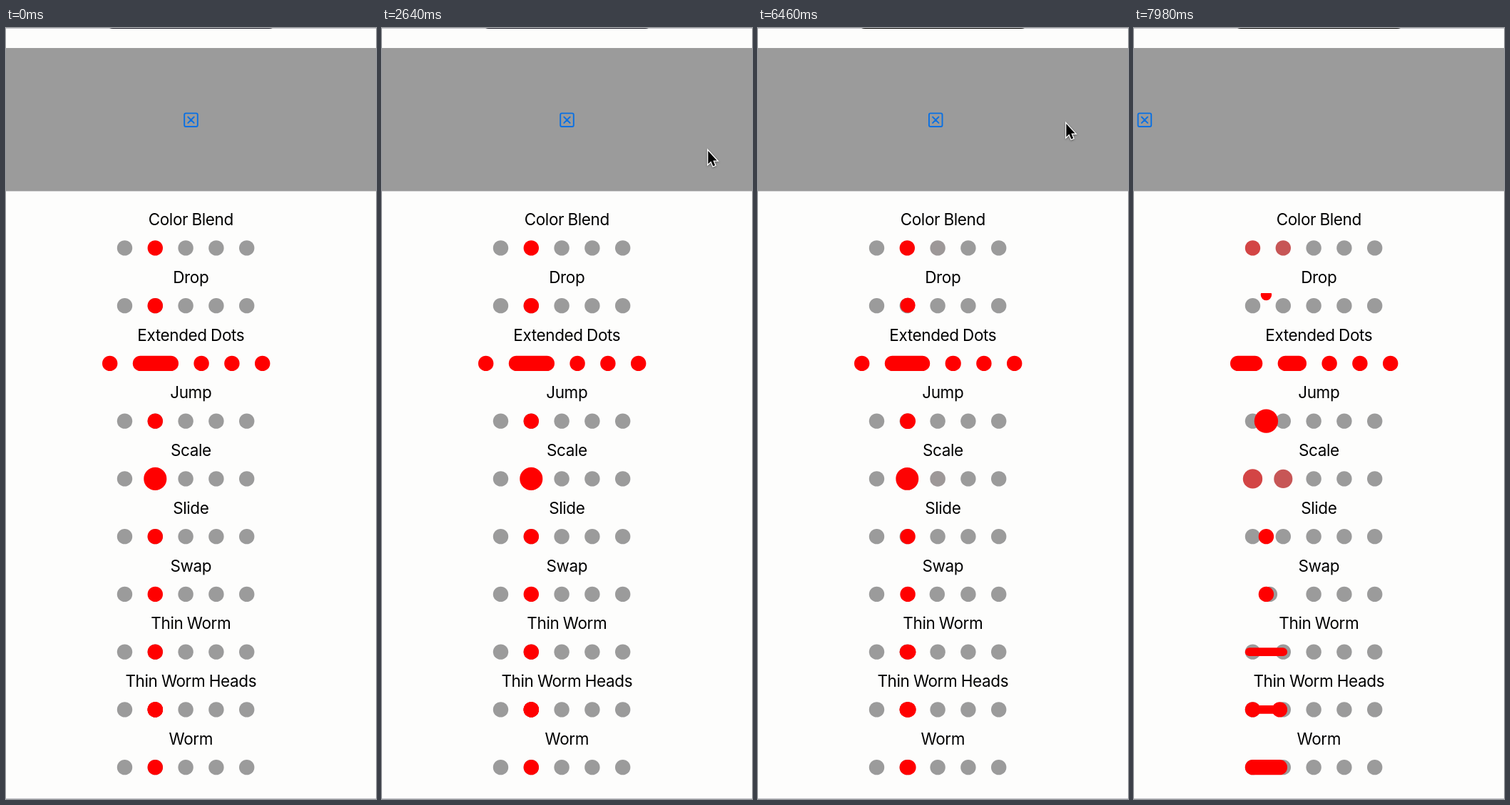
An HTML page with a canvas that plays this animation: 519x1079 px, repeating every 8 s.

```html
<!DOCTYPE html>
<html lang="en">
<head>
<meta charset="utf-8">
<title>Page indicators</title>
<style>
html, body { margin: 0; width: 100%; height: 100%; overflow: hidden; background: #fdfdfc; }
#stage { position: relative; width: 519px; height: 1079px; overflow: hidden; background: #fdfdfc; }
.edge { position: absolute; left: 0; width: 100%; height: 1px; background: #c4c4c8; }
.notch { position: absolute; left: 138px; top: -23px; width: 243px; height: 24px; border-radius: 14px;
  background: #1b1b27; animation: darken 8s step-end infinite; }
@keyframes darken { 62.75% { background: #000; } }
svg, canvas { position: absolute; left: 0; top: 0; width: 519px; height: 1079px; }
text { font: 22.5px Inter, Roboto, sans-serif; letter-spacing: -.4px; word-spacing: -.5px;
  text-anchor: middle; fill: #000; }
</style>
</head>
<body>
<div id="stage">
  <div class="edge" style="top:0"></div>
  <div class="edge" style="bottom:0"></div>
  <div class="notch"></div>
  <svg id="labels" viewBox="0 0 519 1079">
    <rect y="28" width="519" height="200.4" fill="#9b9b9b"/>
  </svg>
  <canvas id="view"></canvas>
</div>
<script>
const LOOP = 8000, GAP = 42.8, R = 10.7, FIRST_X = 166.5, PAGE = 553;
const GREY = [155, 155, 155], RED = [255, 0, 0];
const view = document.getElementById('view');
const ctx = view.getContext('2d');
const ratio = window.devicePixelRatio || 1;
view.width = 519 * ratio;
view.height = 1079 * ratio;

// [time, page position]
const scroll = [[0, 1], [6380, 1], [6460, 1.018], [6600, 1.1], [6800, 1.165], [7000, 1.2],
  [7250, 1.217], [7440, 1.21], [7540, 1.19], [7650, 1.04], [7980, .444], [8000, .41]];
// [time, tip x, tip y]
const pointer = [[60, 24, 1080], [400, 230, 860], [820, 355, 600], [1200, 361, 530], [1520, 360, 516],
  [1660, 362, 500], [2400, 438, 215], [2640, 457, 170], [3240, 470, 146], [3700, 482, 134],
  [4740, 480, 132], [5760, 482, 132], [6000, 479, 132], [6300, 435, 132], [6460, 432, 132],
  [7440, 434, 133], [7540, 434, 133], [7660, 525, 136]];

const mix = (a, b, t) => a + (b - a) * t;

function sample(keys, time) {
  const n = keys.findIndex(k => k[0] > time);
  if (n < 1) return (n ? keys[keys.length - 1] : keys[0]).slice(1);
  const a = keys[n - 1], b = keys[n], t = (time - a[0]) / (b[0] - a[0]);
  return a.slice(1).map((v, i) => mix(v, b[i + 1], t));
}

const tint = t => `rgb(${GREY.map((g, i) => Math.round(mix(g, RED[i], t)))})`;
const at = page => FIRST_X + page * GAP;
const near = (i, p) => Math.max(0, 1 - Math.abs(p - i));

function dot(x, y, r, active) {
  ctx.fillStyle = tint(active);
  ctx.beginPath();
  ctx.arc(x, y, r, 0, 7);
  ctx.fill();
}

function bar(left, right, y, height) {
  ctx.fillStyle = tint(1);
  ctx.beginPath();
  ctx.roundRect(left, y - height / 2, right - left, height, height / 2);
  ctx.fill();
}

function eachDot(draw) {
  for (let i = 0; i < 5; i++) draw(i);
}

const greyDots = y => eachDot(i => dot(at(i), y, R, 0));

// Rises to 1 halfway between two pages
const arch = p => 1 - Math.abs(2 * (p % 1) - 1);

function wormEnds(p) {
  const i = Math.floor(p), t = p - i;
  return [at(i + Math.max(0, 2 * t - 1)), at(i + Math.min(1, 2 * t))];
}

function worm(y, p, thinning) {
  greyDots(y);
  const [a, b] = wormEnds(p);
  bar(a - R, b + R, y, 2 * R * (1 - thinning * arch(p)));
}

function wormHeads(y, p) {
  worm(y, p, .5);
  wormEnds(p).forEach(x => dot(x, y, R, 1));
}

const rows = [
  ['Color Blend', (y, p) => eachDot(i => dot(at(i), y, R, near(i, p)))],
  ['Drop', (y, p) => {
    greyDots(y);
    ctx.save();
    ctx.beginPath();
    ctx.rect(0, y - 17.6, 519, 40);
    ctx.clip();
    dot(at(p), y - 17 * arch(p), R * (1 - .32 * arch(p)), 1);
    ctx.restore();
  }],
  ['Extended Dots', (y, p) => {
    let x = 135;
    eachDot(i => {
      const w = 2 * R + GAP * near(i, p);
      bar(x, x + w, y, 2 * R);
      x += w + 2 * R;
    });
  }],
  ['Jump', (y, p) => {
    greyDots(y);
    dot(at(p), y, R * (1 + .63 * arch(p)), 1);
  }],
  ['Scale', (y, p) => eachDot(i => dot(at(i), y, R * (1 + near(i, p) / 2), near(i, p)))],
  ['Slide', (y, p) => {
    greyDots(y);
    dot(at(p), y, R, 1);
  }],
  ['Swap', (y, p) => {
    const i = Math.floor(p), t = p - i;
    eachDot(n => {
      if (n !== i) dot(at(n === i + 1 ? n - t : n), y, R, 0);
    });
    dot(at(p), y, R, 1);
  }],
  ['Thin Worm', (y, p) => worm(y, p, .5)],
  ['Thin Worm Heads', wormHeads],
  ['Worm', (y, p) => worm(y, p, 0)]
];
const rowY = n => 307.9 + n * 80.75;

rows.forEach(([name], n) => {
  const label = document.createElementNS('http://www.w3.org/2000/svg', 'text');
  label.setAttribute('x', 259.3);
  label.setAttribute('y', rowY(n) - 31.8);
  label.textContent = name;
  document.getElementById('labels').append(label);
});

function icon(x) {
  ctx.strokeStyle = '#0870e4';
  ctx.lineWidth = 1.9;
  ctx.lineCap = 'round';
  ctx.beginPath();
  ctx.roundRect(x - 9.3, 119.4, 18.6, 18.6, 2);
  ctx.moveTo(x - 4.2, 124.5);
  ctx.lineTo(x + 4.2, 132.9);
  ctx.moveTo(x + 4.2, 124.5);
  ctx.lineTo(x - 4.2, 132.9);
  ctx.stroke();
}

const arrow = new Path2D('M.4 2V20.4L4.5 16.6L7.4 23.4L10.2 22.2L7.4 15.6H12.8Z');

function drawPointer(x, y) {
  ctx.save();
  ctx.translate(x, y);
  ctx.lineWidth = 2.6;
  ctx.lineJoin = 'miter';
  ctx.strokeStyle = '#fff';
  ctx.shadowColor = 'rgba(0,0,0,.4)';
  ctx.shadowBlur = 3 * ratio;
  ctx.shadowOffsetY = ratio;
  ctx.stroke(arrow);
  ctx.shadowColor = 'transparent';
  ctx.fillStyle = '#000';
  ctx.fill(arrow);
  ctx.restore();
}

function render(time) {
  const [p] = sample(scroll, time);
  ctx.setTransform(ratio, 0, 0, ratio, 0, 0);
  ctx.clearRect(0, 0, 519, 1079);
  for (let page = 0; page < 3; page++) icon(259.5 + (page - p) * PAGE);
  rows.forEach(([, draw], n) => draw(rowY(n), p));
  if (time > 60 && time < 7660) drawPointer(...sample(pointer, time));
}

const start = performance.now();
function tick() {
  render((performance.now() - start) % LOOP);
  requestAnimationFrame(tick);
}
tick();
</script>
</body>
</html>
```
